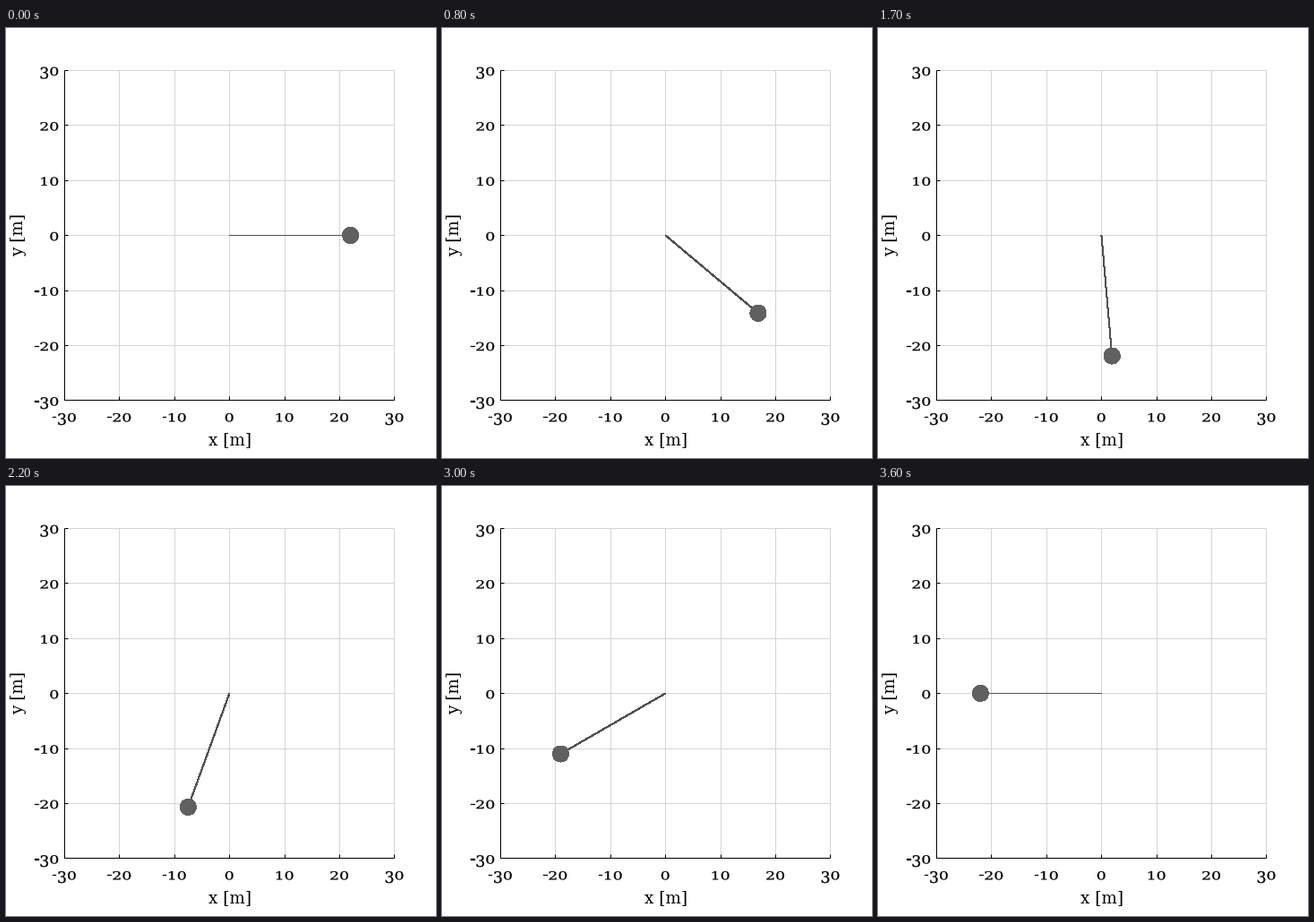
Recreate the animation shown at these times as a matplotlib script. Size 480x480 px, loop 3700 ms.

```python
import numpy as np
import matplotlib.pyplot as plt
from matplotlib.animation import FuncAnimation
from matplotlib.patches import Circle, PathPatch
from matplotlib.textpath import TextPath
from matplotlib.transforms import Affine2D

SIZE, DPI = 480, 100
PX = 72 / DPI                      # one pixel in points
LEFT, RIGHT, TOP, BOTTOM = 65, 433.49, 47, 415.49
LIMIT, LENGTH = 30, 22
SCALE = (RIGHT - LEFT) / (2 * LIMIT)
PIVOT = np.array([249.45, 231.45])
FONT = "DejaVu Serif"
TICKS = range(-LIMIT, LIMIT + 1, 10)
FRAMES, STEP = 37, np.radians(5)

fig = plt.figure(figsize=(SIZE / DPI, SIZE / DPI), dpi=DPI, facecolor="white")
ax = fig.add_axes([0, 0, 1, 1])
ax.set_xlim(0, SIZE)
ax.set_ylim(SIZE, 0)
ax.axis("off")


def line(xs, ys, color, z, **style):
    return ax.plot(xs, ys, color=color, lw=PX, zorder=z,
                   solid_capstyle="butt", **style)[0]


def old_style(x, base, text, align, size=17.3):
    """Old-style figures: 0-2 stand at x-height, 3 hangs below the baseline."""
    steps = [size * (0.338 if c == "-" else 0.636) for c in text]
    x -= sum(steps) * align
    for c, step in zip(text, steps):
        squash = 0.73 if c in "012" else 1
        drop = 3.5 if c == "3" else 0
        glyph = TextPath((0, 0), c, size=size, prop={"family": FONT})
        move = Affine2D().scale(1, -squash).translate(x, base + drop)
        ax.add_patch(PathPatch(move.transform_path(glyph), fc="black",
                               ec="black", lw=0.2))
        x += step


for v in TICKS:
    px = LEFT + SCALE * (v + LIMIT)
    py = BOTTOM - SCALE * (v + LIMIT)
    line([px, px], [TOP, BOTTOM], "#d5d5d5", 1)
    line([LEFT, RIGHT], [py, py], "#d5d5d5", 1)
    line([px, px], [BOTTOM, BOTTOM - 4], "black", 3)
    line([LEFT, LEFT + 4], [py, py], "black", 3)
    old_style(px, 439.4, str(v), 0.5)
    old_style(59.3, py + 6, str(v), 1)

line([LEFT, LEFT], [TOP, BOTTOM], "black", 3)
line([LEFT, RIGHT], [BOTTOM, BOTTOM], "black", 3)

label = dict(family=FONT, fontsize=18.4 * PX, color="black", ha="center")
ax.text(250, 465, "x [m]", va="baseline", **label)
ax.text(19, 230.5, "y [m]", rotation=90, rotation_mode="anchor",
        va="baseline", **label)

rod = line([], [], "#505050", 4, antialiased=False)
bob = ax.add_patch(Circle(PIVOT, 9, fc="#606060", lw=0, zorder=5,
                          antialiased=False))


def update(i):
    angle = STEP * i
    end = PIVOT + LENGTH * SCALE * np.array([np.cos(angle), np.sin(angle)])
    rod.set_data(*zip(PIVOT, end))
    bob.center = tuple(end)
    return rod, bob


anim = FuncAnimation(fig, update, frames=FRAMES, interval=100,
                     repeat=True, repeat_delay=0)
plt.show()
```
